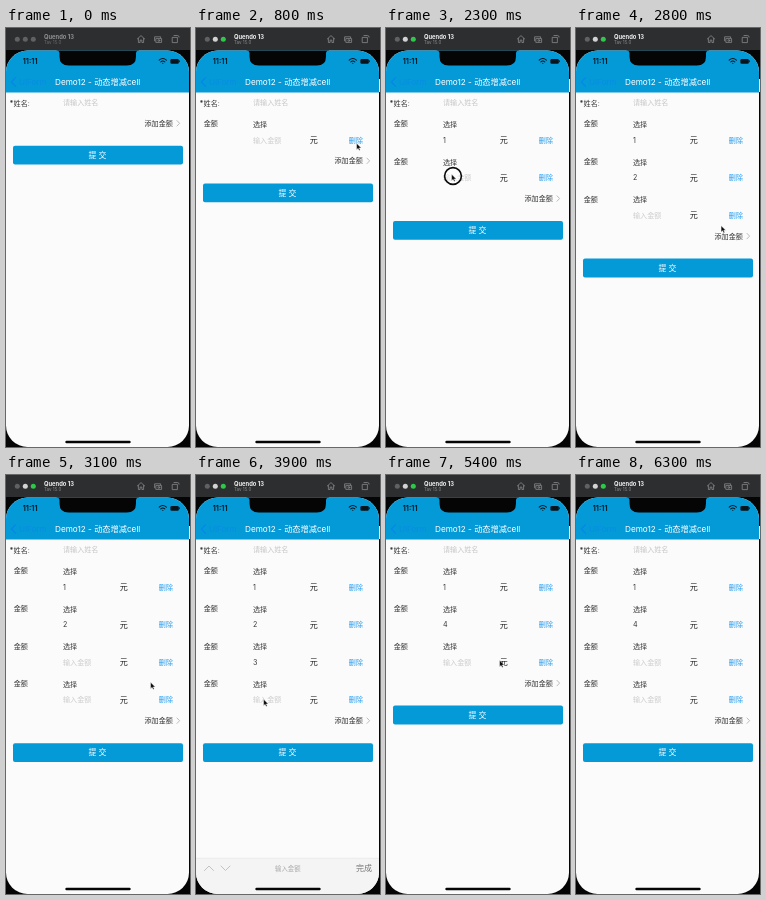
Write an HTML page that moves like this. It is 184 by 419 pixels and loops after 6.4 s.

```html
<!DOCTYPE html>
<html lang="zh">
<head>
<meta charset="utf-8">
<title>动态增减cell</title>
<style>
  html, body { margin: 0; width: 100%; height: 100%; overflow: hidden; background: #000; }
  svg { display: block; width: 184px; height: 419px; }
  text { font: 7.1px Inter, "Noto Sans CJK SC", "Noto Sans CJK", sans-serif; fill: #363636; }
  .title { font-size: 8.2px; fill: #fff; }
  .submit { font-size: 7.9px; font-weight: 500; fill: #fff; }
  .hint { fill: #c6c6c6; }
  .soft { fill: #cdcdcd; }
  .link { fill: #219bf0; }
  .unit { font-size: 8px; fill: #1c1c1c; }
  .line { fill: none; stroke-linecap: round; stroke-linejoin: round; }
  .device { font-size: 5.8px; font-weight: 700; fill: #8f9092; }
  .system { font-size: 4.5px; fill: #6c6d6f; }
  .focused .device { fill: #f0f0f0; }
  .focused .system { fill: #8c8d8f; }
  .light { fill: #606163; }
  .focused .middle { fill: #d2d2d2; }
  .focused .green { fill: #30c84a; }
</style>
</head>
<body>
<svg viewBox="0 0 184 419">
  <defs>
    <clipPath id="screen"><rect y="22.6" width="183" height="396.4" rx="21.5"/></clipPath>
  </defs>
  <rect width="184" height="419" fill="#050505"/>

  <g id="windowBar">
    <rect width="184" height="22" fill="#2d2e30"/>
    <circle class="light" cx="11.3" cy="11.3" r="2.5"/>
    <circle class="light middle" cx="19.3" cy="11.3" r="2.5"/>
    <circle class="light green" cx="27.3" cy="11.3" r="2.5"/>
    <text class="device" x="38" y="10.6">Quendo 13</text>
    <text class="system" x="38" y="16.3">Tav 15.0</text>
    <g class="line" stroke="#87888a" stroke-width=".8">
      <path d="M131.3 11 135 7.6l3.7 3.4M132.4 10.5v4h1.7v-2.4h1.8v2.4h1.7v-4"/>
      <path d="M148.6 12.8v-4h6v1.2M150.2 10.6h5.4v3.8h-5.4z"/>
      <circle cx="152.9" cy="12.5" r=".9"/>
      <path d="M166.6 9.4h4.8v5.2h-4.8zM168 7.5h3.6q1.5 0 1.5 1.6"/>
    </g>
  </g>

  <g clip-path="url(#screen)">
    <rect y="22" width="184" height="397" fill="#fbfbfb"/>
    <rect y="22" width="184" height="42.5" fill="#0499d7"/>
    <path d="M50.5 22v.6q3 0 3 3v2.8q0 9.2 9.2 9.2h58.1q9.2 0 9.2-9.2v-2.8q0-3 3-3v-.6z" fill="#050505"/>
    <text x="16.7" y="36" style="font-size:7.4px;font-weight:600;fill:#07141c">11:11</text>
    <g class="line" stroke="#07141c" stroke-width="1.1">
      <path d="M153.2 32.1q3.6-3.2 7.2 0M154.8 33.8q2-1.7 4 0M156.7 35.2h.2"/>
    </g>
    <rect x="164.4" y="30.9" width="8.4" height="4.8" rx="1.3" fill="#07141c"/>
    <rect x="173.2" y="32.4" width=".8" height="1.8" fill="#07141c"/>
    <path class="line" d="M9.6 49.6 5.4 54l4.2 4.4" stroke="#0787ea" stroke-width="1.2"/>
    <text x="13" y="57" style="font-size:8px;fill:#078ee4">UIForm</text>
    <text class="title" x="49" y="57.1">Demo12 - 动态增减cell</text>
    <text x="3.5" y="78" style="font-weight:700">*</text>
    <text x="7.6" y="77.6">姓名:</text>
    <text class="hint" x="57" y="77.3">请输入姓名</text>

    <g id="rows"></g>
    <g id="footer">
      <text x="138.5" y="97.8">添加金额</text>
      <path class="line" d="M171 92.6l2.6 2.7-2.6 2.7" stroke="#b5b5b7" stroke-width=".9"/>
      <rect x="7" y="117.8" width="170" height="18.8" rx="2" fill="#0499d7"/>
      <text class="submit" x="82.6" y="130.1">提 交</text>
    </g>

    <g id="toolbar">
      <rect width="184" height="40" fill="#f4f4f5"/>
      <path d="M0 .2h184" stroke="#dcdcde" stroke-width=".5"/>
      <path class="line" d="M8.5 12.5l4.5-4.5 4.5 4.5M25 8l4.5 4.5L34 8" stroke="#c2c2c4" stroke-width="1"/>
      <text x="79" y="12.8" style="font-size:6.4px;fill:#aaa">输入金额</text>
      <text x="160" y="13.2" style="font-size:8px;fill:#777">完成</text>
    </g>
    <rect x="59.3" y="412.8" width="65.4" height="2.4" rx="1.2" fill="#050505"/>
  </g>
  <rect id="edge" x="183" y="51" width="1" height="13" fill="#e8eef2"/>

  <g id="cursor">
    <circle id="ring" cx="1" cy="1" r="8.4" fill="#fff" fill-opacity=".3" stroke="#0a0a0a" stroke-width="1.6"/>
    <path d="M-.4-.7v6.4l1.5-1.4 1 2.3 1.1-.5-1-2.2h2z" fill="#0a0a0a" stroke="#fff" stroke-width=".4"/>
  </g>
</svg>
<script>
  const LOOP = 6400, STEP = 100, ROW_H = 37.6, FADE = 200;
  const byId = id => document.getElementById(id);
  const clamp = v => Math.min(1, Math.max(0, v));
  const ease = v => { const k = clamp(v); return k * k * (3 - 2 * k); };

  const rows = [
    { born: 600, value: 1, typed: 1900 },
    { born: 1000, value: 2, typed: 2500, gone: 4200 },
    { born: 2600, value: 3, typed: 3500, gone: 4800 },
    { born: 2900, value: 4, typed: 4000 },
    { born: 5100 },
    { born: 5800 }
  ];
  // time, x, y
  const path = [
    [300, 168, 128], [500, 160, 97], [700, 161, 98], [900, 161, 134], [1200, 160, 139],
    [1600, 66, 113], [2000, 66, 114], [2200, 66, 147], [2400, 66, 147], [2600, 147, 171],
    [2900, 145, 208], [3100, 145, 208], [3300, 68, 187], [3500, 68, 187], [3700, 68, 225],
    [3900, 68, 225], [4200, 157, 149], [4800, 157, 151], [5100, 148, 171],
    [5400, 114, 186], [5700, 146, 208], [5900, 146, 209], [6200, 172, 245]
  ];
  const clicks = [600, 1000, 1700, 2300, 2600, 2900, 3300, 3700, 4200, 4800, 5100, 5800];
  // toolbar shown from, hidden from
  const editing = [[1700, 2100], [2400, 2600], [3300, 4350]];

  for (const row of rows) {
    row.node = document.createElementNS("http://www.w3.org/2000/svg", "g");
    row.node.innerHTML = `
      <text x="7.7" y="98.4">金额</text>
      <text x="57" y="99.3">选择</text>
      <text class="field" x="57" y="114.7"></text>
      <text class="unit" x="113.7" y="115.2">元</text>
      <text class="link" x="152.8" y="114.7">删除</text>`;
    row.field = row.node.querySelector(".field");
    byId("rows").append(row.node);
  }

  const shift = (node, x, y) => node.setAttribute("transform", `translate(${x} ${y})`);
  const show = (node, on) => node.setAttribute("visibility", on ? "visible" : "hidden");
  const span = (t, from, to = Infinity) => ease((t - from) / FADE) * (1 - ease((t - to) / FADE));

  function cursorAt(t) {
    const i = path.findIndex(p => p[0] > t);
    if (i < 1) return null;
    const [a, b] = [path[i - 1], path[i]];
    const k = ease((t - a[0]) / (b[0] - a[0]));
    return [a[1] + (b[1] - a[1]) * k, a[2] + (b[2] - a[2]) * k];
  }

  function draw(t) {
    let offset = 0;
    for (const row of rows) {
      const presence = span(t, row.born, row.gone);
      const filled = t >= row.typed;
      shift(row.node, 0, offset);
      row.node.setAttribute("opacity", presence);
      row.field.textContent = filled ? row.value : "输入金额";
      row.field.setAttribute("class", filled ? "field" : "field soft");
      offset += ROW_H * presence;
    }
    shift(byId("footer"), 0, offset);

    const raised = Math.max(...editing.map(([from, to]) => span(t, from, to)));
    shift(byId("toolbar"), 0, 419 - 36 * raised);
    show(byId("toolbar"), raised > 0);

    const focused = t >= 300;
    byId("windowBar").classList.toggle("focused", focused);
    show(byId("edge"), focused);

    const spot = cursorAt(t);
    show(byId("cursor"), spot);
    if (spot) shift(byId("cursor"), ...spot);
    show(byId("ring"), spot && clicks.includes(t));
  }

  const start = performance.now();
  function tick() {
    const t = (performance.now() - start) % LOOP;
    draw(Math.floor(t / STEP) * STEP);
    requestAnimationFrame(tick);
  }
  tick();
</script>
</body>
</html>
```
